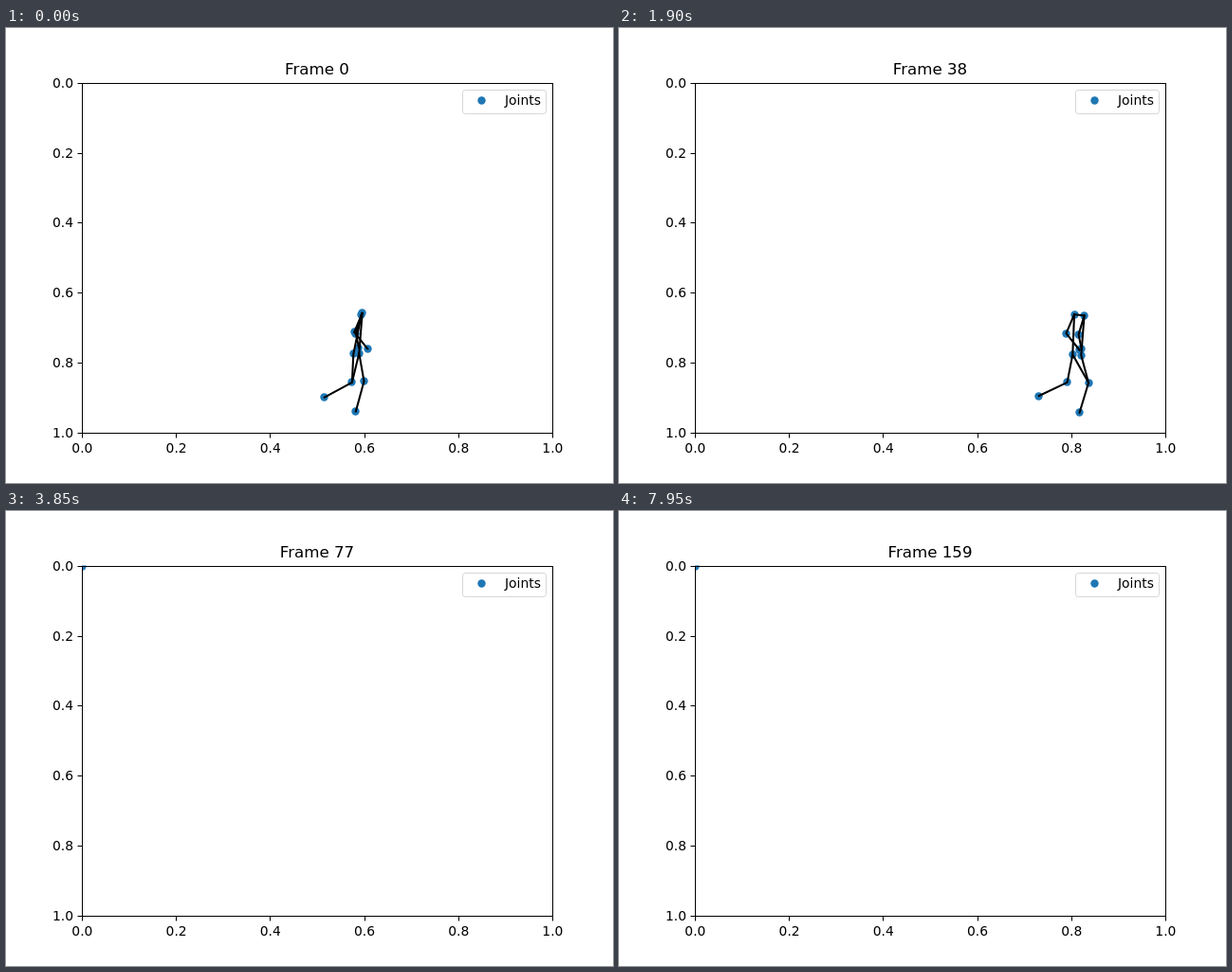
Animation of 640x480 px, one loop 8 s. Source, as an HTML page with a canvas:

```html
<!DOCTYPE html>
<html lang="en">
<head>
<meta charset="utf-8">
<title>Walking joints</title>
<style>
  html, body { margin: 0; width: 100%; height: 100%; overflow: hidden; background: #fff; }
  canvas { display: block; }
</style>
</head>
<body>
<canvas id="stage" width="640" height="480"></canvas>
<script>
const ctx = document.getElementById('stage').getContext('2d');
const STEP_MS = 50, STEPS = 160, EXIT_STEP = 71;
const LEFT = 80, RIGHT = 576, TOP = 57.6, BOTTOM = 427.2;
const BLUE = '#1f77b4', DOT_RADIUS = 4.2;
const FONT = '"DejaVu Sans", sans-serif';

// Path of the hip centre, with body lean, turn towards the viewer and gait cycles walked.
const PATH = [
  { step: 0, x: 369.3, y: 343.5, lean: 6, turn: -3, cycles: 0.32 },
  { step: 21, x: 432.5, y: 340.8, lean: 1, turn: 1.8, cycles: 0.86 },
  { step: 38, x: 482.8, y: 344.8, lean: 2.5, turn: 4.5, cycles: 1.77 },
  { step: 49, x: 507.4, y: 340.3, lean: 4, turn: 1, cycles: 2.39 },
  { step: 70, x: 563, y: 342, lean: 3, turn: 2, cycles: 3.25 }
];
const TORSO = 42, THIGH = 30, SHANK = 33, LEG_DROP = 61;
const STRIDE = { front: 14, back: -40, toeOff: 0.77, lift: 18 };
const ARMS = [{ elbow: [-8.5, 20], wrist: [14, 17.5] }, { elbow: [-6, 20], wrist: [3, 15] }];

const mix = (a, b, k) => a + (b - a) * k;
const add = (p, q) => [p[0] + q[0], p[1] + q[1]];

function bodyAt(step) {
  const i = Math.max(1, PATH.findIndex(point => point.step >= step));
  const a = PATH[i - 1], b = PATH[i], k = (step - a.step) / (b.step - a.step);
  return Object.fromEntries(Object.keys(a).map(key => [key, mix(a[key], b[key], k)]));
}

function ankleOffset(phase) {
  const { front, back, toeOff, lift } = STRIDE;
  const rise = lift * Math.max(0, 1 - ((phase - 0.75) / 0.17) ** 2);
  if (phase < toeOff) return [mix(front, back, (phase / toeOff) ** 1.5), LEG_DROP - rise];
  const k = (phase - toeOff) / (1 - toeOff);
  return [mix(back, front, k * k * (3 - 2 * k)), LEG_DROP - rise];
}

// Two-link geometry, bent forwards.
function kneeBetween(hip, ankle) {
  const dx = ankle[0] - hip[0], dy = ankle[1] - hip[1], length = Math.hypot(dx, dy);
  const along = (THIGH ** 2 - SHANK ** 2 + length ** 2) / (2 * length);
  const out = Math.sqrt(Math.max(0, THIGH ** 2 - along ** 2));
  return add(hip, [(dx * along + dy * out) / length, (dy * along - dx * out) / length]);
}

function limbs(body, side) {
  const sign = side ? 1 : -1;
  const { x, y, lean, turn, cycles } = body;
  const hip = [x + sign * turn, y + sign * 0.4];
  const shoulder = [x + lean + sign * (1.9 + 0.75 * turn), y - TORSO + sign * 0.6];
  const elbow = add(shoulder, ARMS[side].elbow);
  const wrist = add(elbow, ARMS[side].wrist);
  const ankle = add([x, y], ankleOffset((cycles + side / 2) % 1));
  return { shoulder, elbow, wrist, hip, knee: kneeBetween(hip, ankle), ankle };
}

function text(label, x, y, size, align) {
  ctx.font = `${size}px ${FONT}`;
  ctx.textAlign = align;
  ctx.fillStyle = '#000';
  ctx.fillText(label, x, y);
}

function polyline(...points) {
  ctx.beginPath();
  points.forEach(p => ctx.lineTo(...p));
  ctx.stroke();
}

// Markers sit on whole pixels.
function dot([x, y]) {
  ctx.fillStyle = BLUE;
  ctx.beginPath();
  ctx.arc(Math.floor(x) + 0.5, Math.floor(y) + 0.5, DOT_RADIUS, 0, 2 * Math.PI);
  ctx.fill();
}

function drawWalker(step) {
  const body = bodyAt(step);
  const near = limbs(body, 0), far = limbs(body, 1);
  [near, far].forEach(side => Object.values(side).forEach(dot));
  ctx.strokeStyle = '#000';
  ctx.lineWidth = 2.08;
  ctx.lineCap = 'square';
  ctx.lineJoin = 'round';
  for (const { shoulder, elbow, wrist, hip, knee, ankle } of [near, far]) {
    polyline(shoulder, elbow, wrist);
    polyline(shoulder, hip, knee, ankle);
  }
  polyline(near.shoulder, far.shoulder);
  polyline(near.hip, far.knee);
}

function drawPlot(step) {
  ctx.save();
  ctx.beginPath();
  ctx.rect(LEFT, TOP, RIGHT - LEFT, BOTTOM - TOP);
  ctx.clip();
  if (step < EXIT_STEP) drawWalker(step);
  else dot([LEFT, 58]);
  ctx.restore();
}

function drawAxes() {
  ctx.strokeStyle = '#000';
  ctx.lineWidth = 1;
  ctx.strokeRect(80.5, 58.5, 496, 369);
  for (let i = 0; i <= 5; i++) {
    const x = mix(LEFT, RIGHT, i / 5), y = mix(TOP, BOTTOM, i / 5);
    const tickX = Math.round(x) + 0.5, tickY = Math.round(y) + 0.5;
    const label = (i / 5).toFixed(1);
    polyline([tickX, 428], [tickX, 432.5]);
    polyline([75.5, tickY], [80, tickY]);
    text(label, x + 0.4, 448, 13.89, 'center');
    text(label, 71, Math.round(y) + 5, 13.89, 'right');
  }
}

function drawLegend() {
  ctx.beginPath();
  ctx.roundRect(481.5, 65.5, 88, 25, 2.8);
  ctx.fillStyle = '#fff';
  ctx.fill();
  ctx.strokeStyle = '#d6d6d6';
  ctx.lineWidth = 1;
  ctx.stroke();
  dot([501, 76]);
  text('Joints', 526, 81, 13.89, 'left');
}

function render(time) {
  const step = Math.floor(time / STEP_MS) % STEPS;
  ctx.fillStyle = '#fff';
  ctx.fillRect(0, 0, 640, 480);
  drawPlot(step);
  drawAxes();
  drawLegend();
  text(`Frame ${step}`, 328, 49, 16.67, 'center');
  requestAnimationFrame(() => render(performance.now() - start));
}

const start = performance.now();
render(0);
</script>
</body>
</html>
```
